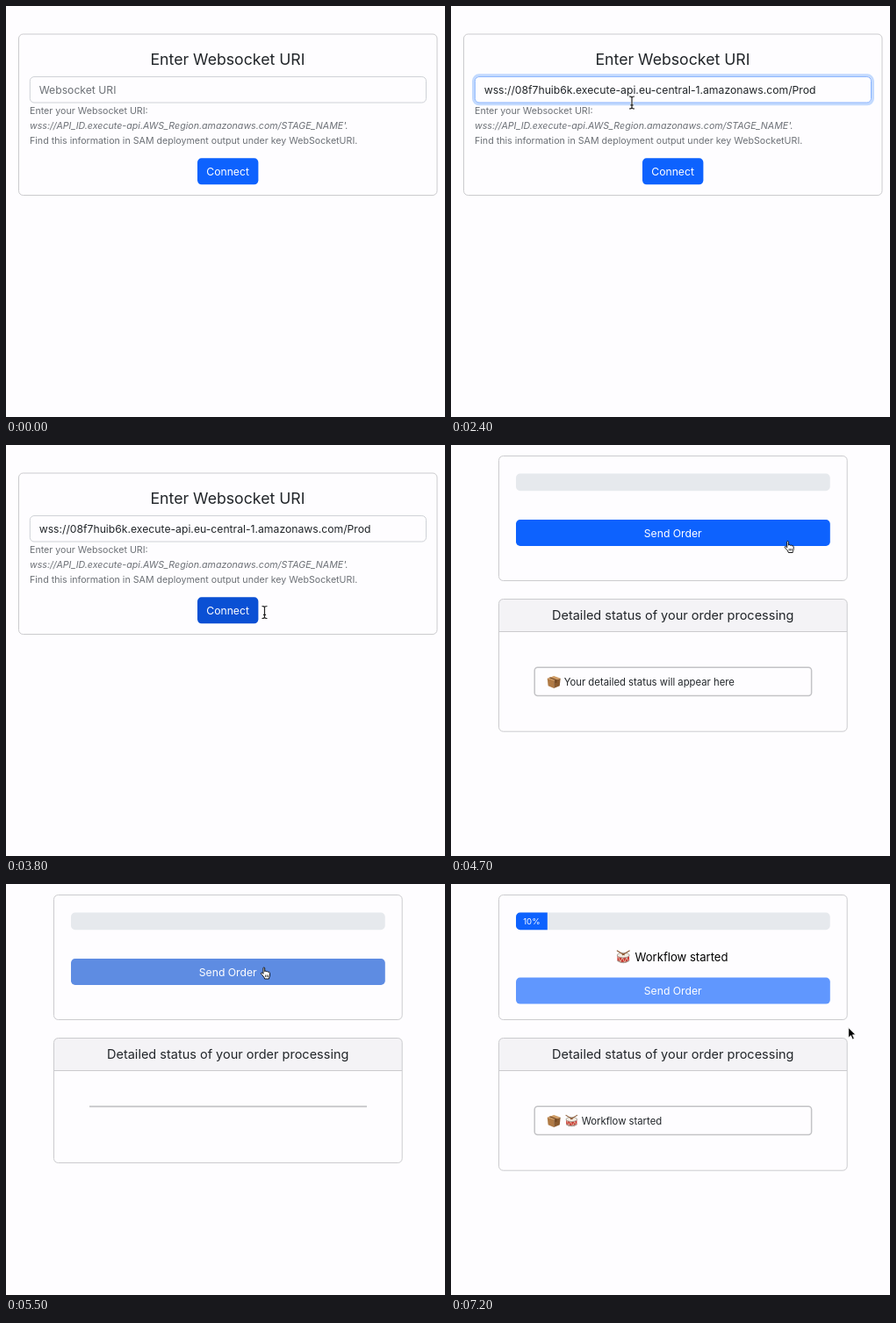
Animation of 500 by 468 pixels, one loop 8 s. Source, as an HTML page:

```html
<!DOCTYPE html>
<html lang="en">
<head>
<meta charset="utf-8">
<title>Order workflow</title>
<style>
  html, body { margin: 0; height: 100%; overflow: hidden; background: #fefdff; }
  svg { display: block; width: 500px; height: 468px; font: 12.2px Inter, Roboto, sans-serif; fill: #212529; }
  .frame { fill: none; stroke: #cbcbce; }
  .help { font-size: 10.67px; fill: #6c7076; }
  .mid { text-anchor: middle; }
  .white { fill: #fff; }
</style>
</head>
<body>
<svg viewBox="0 0 500 468">
  <defs>
    <symbol id="box" viewBox="0 0 16 16" overflow="visible">
      <path fill="#b07a45" d="M0 4 8 6.5V16L1 13Z"/>
      <path fill="#8a5a2e" d="M16 4 8 6.5V16L15 13Z"/>
      <path fill="#cf9c66" d="M0 4 8 1l8 3-8 2.8Z"/>
      <path fill="#6e4522" d="M3.5 2.7 11.5 5.5V9l-2 .7V6L2 3.3Z"/>
    </symbol>
    <symbol id="drum" viewBox="0 0 16 16" overflow="visible">
      <path fill="#c8342f" d="M1 6.5V13Q8 18 15 13V6.5Z"/>
      <path fill="none" stroke="#e9c9b0" stroke-width=".9" d="M2 8l2.5 6L7 9l2.5 6L12 9l2 4"/>
      <path fill="none" stroke="#a9a29a" stroke-width="1.3" d="M1 12.6Q8 17.4 15 12.6"/>
      <ellipse cx="8" cy="6.3" rx="7.2" ry="2.9" fill="#f3ece2" stroke="#a9a29a"/>
      <path fill="none" stroke="#8c5a37" stroke-width="1.2" stroke-linecap="round" d="M.8 1 9 6M15.2 1 7 6"/>
    </symbol>
  </defs>

  <g id="connectPage">
    <rect class="frame" x="14.5" y="32" width="476.5" height="183.5" rx="5"/>
    <text class="mid" x="252.5" y="66.5" font-size="17.7">Enter Websocket URI</text>
    <rect id="ring" x="25.5" y="78.8" width="455" height="33" rx="6.5" fill="none" stroke="#c3dafe" stroke-width="3"/>
    <rect id="field" x="27.3" y="80.6" width="451.2" height="29.4" rx="4.7" fill="#fefdff"/>
    <text id="uri" x="37.7" y="100.3"></text>
    <rect id="caret" y="88" width="1" height="15"/>
    <g class="help">
      <text x="27" y="123">Enter your Websocket URI:</text>
      <text x="27" y="140" font-style="italic">wss://API_ID.execute-api.AWS_Region.amazonaws.com/STAGE_NAME'.</text>
      <text x="27" y="156.7">Find this information in SAM deployment output under key WebSocketURI.</text>
    </g>
    <rect id="connect" x="218" y="173.3" width="69.4" height="30" rx="4.7"/>
    <text class="mid white" x="252.6" y="193">Connect</text>
  </g>

  <g id="orderPage">
    <rect class="frame" x="54.5" y="12.5" width="396.7" height="142" rx="5"/>
    <clipPath id="track"><rect x="74" y="32.6" width="357.7" height="19.6" rx="4.7"/></clipPath>
    <g clip-path="url(#track)">
      <rect x="74" y="32" width="358" height="21" fill="#e6e9ed"/>
      <rect id="bar" x="74" y="32" height="21" fill="#0d62fe"/>
      <text id="percent" class="mid white" y="46" font-size="9.6">10%</text>
    </g>
    <g id="stage">
      <use href="#drum" x="188.5" y="75" width="15.5" height="15.5"/>
      <text x="209.5" y="88" font-size="13.1" fill="#000">Workflow started</text>
    </g>
    <g id="send">
      <rect id="sendFace" x="74" y="85" width="357.8" height="30" rx="4.7"/>
      <text class="mid white" x="252.7" y="104.8">Send Order</text>
    </g>
    <path fill="#f4f3f6" d="M54.5 212.5V180.5a5 5 0 0 1 5-5H446.2a5 5 0 0 1 5 5V212.5Z"/>
    <path class="frame" d="M54.5 212.5H451"/>
    <rect id="panel" class="frame" x="54.5" y="175.5" width="396.7" rx="5"/>
    <text class="mid" x="252.7" y="199.3" font-size="14.5">Detailed status of your order processing</text>
    <path id="emptyList" d="M95 253.4H411" stroke="#c3c3c6" stroke-width="1.6"/>
    <g id="list">
      <rect x="95.2" y="253.2" width="315.4" height="32.4" rx="3.5" fill="none" stroke="#c3c3c6" stroke-width="1.5"/>
      <use href="#box" x="109.7" y="262" width="15" height="15"/>
      <use id="listDrum" href="#drum" x="130.3" y="262.5" width="14" height="14"/>
      <text id="status" y="274" font-size="11.3"></text>
    </g>
  </g>

  <g id="cursor" stroke-linejoin="round">
    <path id="arrow" fill="#000" stroke="#fff" stroke-width=".8" d="M0 0V11.5L2.7 9 4.6 13.4 6.6 12.5 4.7 8.3H8.3Z"/>
    <g id="beam" fill="none">
      <path stroke="#fff" stroke-width="2.6" d="M0-6V6"/>
      <path stroke="#222" stroke-width="1.2" d="M-3-7Q0-7 0-5.5Q0-7 3-7M0-5.5V5.5M-3 7Q0 7 0 5.5Q0 7 3 7M-1.6 2.8H1.6"/>
    </g>
    <g id="hand" stroke="#000" stroke-width=".9">
      <path fill="#fff" d="M3 1.3C3 .2 4.6 .2 4.7 1.3V5.2C5 4.4 6.6 4.5 6.8 5.4 7.2 4.7 8.5 5 8.7 5.9 9.4 5.4 10.5 5.8 10.5 7V9.5C10.5 11 9.6 11.6 9.5 13.5H4.6C4.4 11.5 2 9.6 .6 7.8 0 6.8 1.3 6 2 6.8L3 7.8Z"/>
      <path fill="none" stroke-width=".7" d="M5.4 9V11.5M7 9V11.5M8.6 9V11.5"/>
    </g>
  </g>
</svg>
<script>
const LOOP = 8000, STEP = 100;
const BLUE = [13, 98, 254], DARK = [10, 80, 212];
const el = id => document.getElementById(id);
const set = (id, attrs) => { for (const k in attrs) el(id).setAttribute(k, attrs[k]); };
const show = (id, on) => set(id, { display: on ? 'inline' : 'none' });
const ramp = (t, from, to) => Math.min(1, Math.max(0, (t - from) / (to - from)));
const smooth = p => p * p * (3 - 2 * p);
const mix = (a, b, p) => `rgb(${a.map((v, i) => Math.round(v + (b[i] - v) * p))})`;

// time, x, y
const path = [
  [100, 264, 335], [600, 188, 108], [800, 188, 108], [900, 188, 103], [2300, 188, 103],
  [2400, 206, 110], [3100, 253, 190], [3300, 253, 190], [3800, 294.5, 190.5], [4000, 294.5, 190.5],
  [4200, 472, 203], [4500, 489, 198], [4700, 379.7, 109], [5200, 290, 94.5], [5600, 290, 94.5],
  [5900, 422.3, 133.3], [6300, 452.7, 163.5]
];
// start time, cursor shape
const shapes = [[100, 'arrow'], [500, 'beam'], [2900, 'hand'], [3700, 'beam'], [4100, 'arrow'], [4700, 'hand'], [5700, 'arrow']];

function pointAt(t) {
  const i = path.findIndex(k => k[0] > t);
  if (i < 0) return path[path.length - 1].slice(1);
  if (!i) return path[0].slice(1);
  const [a, b] = [path[i - 1], path[i]], p = smooth(ramp(t, a[0], b[0]));
  return [a[1] + (b[1] - a[1]) * p, a[2] + (b[2] - a[2]) * p];
}

function drawCursor(t) {
  const [x, y] = pointAt(t);
  const shape = shapes.filter(s => s[0] <= t).pop();
  show('cursor', shape);
  set('cursor', { transform: `translate(${x} ${y})` });
  for (const id of ['arrow', 'beam', 'hand']) show(id, shape && shape[1] === id);
}

function drawConnect(t) {
  const pasted = t >= 1900;
  const focus = ramp(t, 1300, 1500) - ramp(t, 3200, 3400);
  set('ring', { opacity: focus });
  set('field', { stroke: mix([206, 209, 214], [134, 178, 254], focus) });
  el('uri').textContent = pasted ? 'wss://08f7huib6k.execute-api.eu-central-1.amazonaws.com/Prod' : 'Websocket URI';
  set('uri', { fill: pasted ? '#212529' : '#6c7076' });
  set('caret', { x: pasted ? 413 : 37.5 });
  show('caret', t >= 1400 && t < 3300 && (t - 1400) % 1000 < (pasted ? 1000 : 500) && !(t >= 2400 && t < 2900));
  set('connect', { fill: mix(BLUE, DARK, ramp(t, 2800, 3000)) });
}

function drawOrder(t) {
  const sent = t >= 5400, started = t >= 5600;
  const grow = 35.8 * smooth(ramp(t, 5900, 6500));
  set('bar', { width: grow });
  set('percent', { x: 74 + grow / 2 });
  show('percent', grow);
  show('stage', started);
  set('send', { transform: `translate(0 ${started ? 21.6 : 0})`, opacity: sent ? .65 : 1 });
  set('sendFace', { fill: mix(BLUE, DARK, ramp(t, 4700, 4900) - ramp(t, 5500, 5700)) });
  const empty = sent && !started;
  set('panel', { height: empty ? 142 : 150.7 });
  show('emptyList', empty);
  show('list', !empty);
  show('listDrum', started);
  el('status').textContent = started ? 'Workflow started' : 'Your detailed status will appear here';
  set('status', { x: started ? 148.7 : 128.7 });
}

function draw(now) {
  const t = Math.floor(now % LOOP / STEP) * STEP;
  const ordering = t >= 3900;
  show('connectPage', !ordering);
  show('orderPage', ordering);
  ordering ? drawOrder(t) : drawConnect(t);
  drawCursor(t);
  requestAnimationFrame(draw);
}
draw(0);
</script>
</body>
</html>
```
